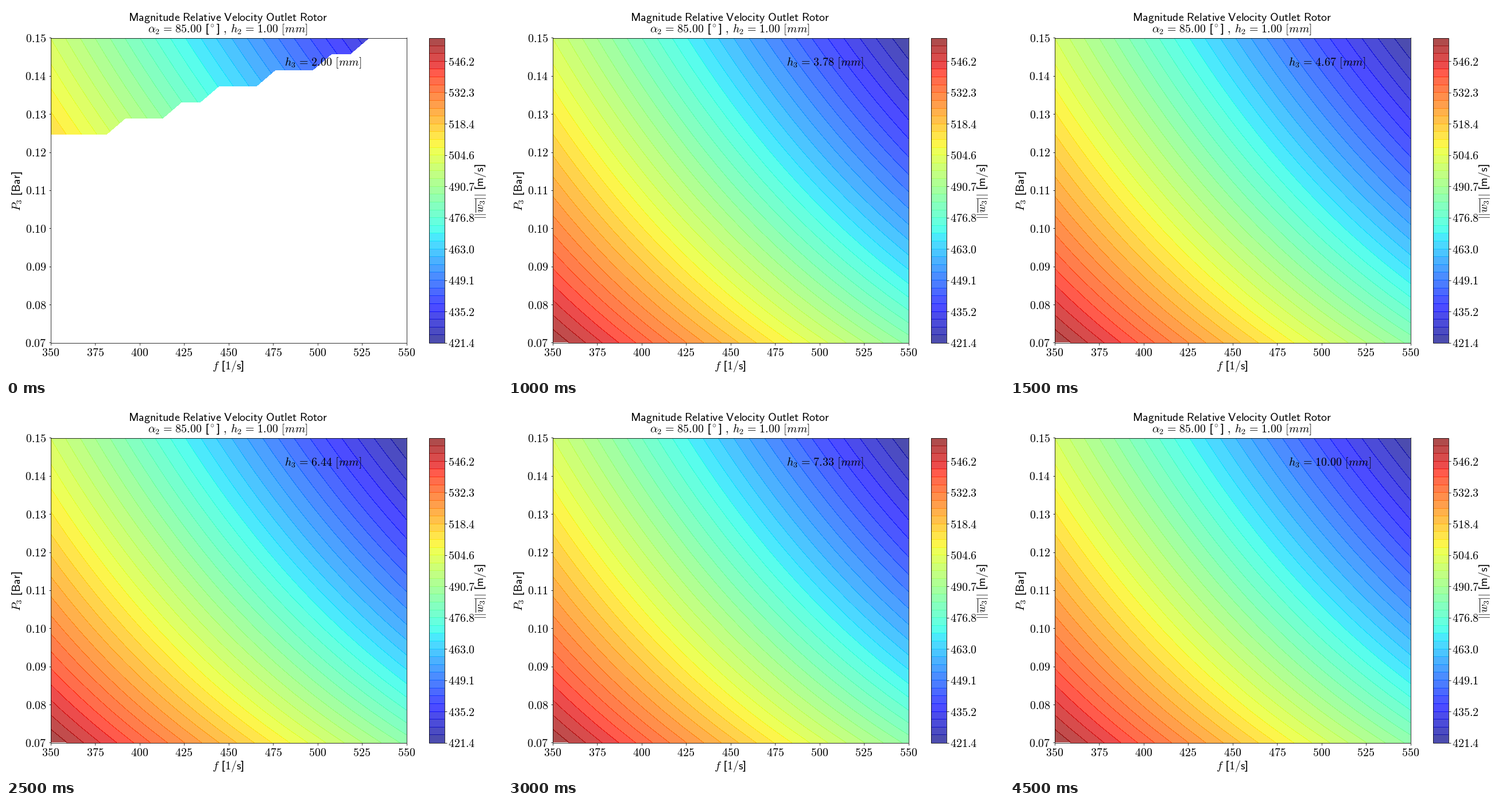
Recreate the animation shown at these times as a matplotlib script. Size 864x648 px, loop 5000 ms.

```python
import numpy as np
import matplotlib.pyplot as plt
from matplotlib.animation import FuncAnimation

W, H, DPI = 864, 648, 72
FRAMES, STEP = 10, 500
N = 20

plt.rcParams.update({
    "font.family": "Liberation Sans",
    "font.size": 20,
    "mathtext.fontset": "cm",
    "axes.linewidth": 0.8,
})

EQ = r"\hspace{0.12}=\hspace{0.12}"
GAP = r"\hspace{0.38}"

fig = plt.figure(figsize=(W / DPI, H / DPI), dpi=DPI, facecolor="white")


def box(left, top, right, bottom):
    """Axes placed by pixel edges, measured from the top left."""
    return fig.add_axes([left / W, 1 - bottom / H,
                         (right - left) / W, (bottom - top) / H])


def put(x, y, s, ha="center", **kw):
    return fig.text(x / W, 1 - y / H, s, ha=ha, va="baseline",
                    rotation_mode="anchor", **kw)


def sans(s):
    return r"\mathsf{" + s.replace(" ", r"\ ") + "}"


def numbers(values, digits):
    return [rf"$\mathrm{{{v:.{digits}f}}}$" for v in values]


# Relative velocity over rotation frequency and outlet pressure
freq = np.linspace(350, 550, N)
pres = np.linspace(0.07, 0.15, N)
F, P = np.meshgrid(freq, pres)
u = (F - 350) / 200
speed = np.sqrt(251080 - 83762 * u + 10235 * u**2 + 77000 * np.log(0.15 / P))
levels = np.linspace(speed.min(), speed.max(), 40)


def feasible(first_row, last_cols):
    """Keep, from first_row upwards, the columns up to each row's last one."""
    last = np.full(N, -1)
    last[first_row:first_row + len(last_cols)] = last_cols
    last[first_row + len(last_cols):] = N - 1
    return np.arange(N)[None, :] <= last[:, None]


masks = [
    feasible(13, [3, 6, 8, 11, 14, 16, 17]),
    feasible(2, [2, 7, 12, 17]),
    feasible(0, []),
]

ax = box(77.5, 55.5, 697.5, 586.5)
fills = [ax.contourf(F, P, np.ma.masked_where(~m, speed), levels=levels,
                     cmap="jet", alpha=0.7, antialiased=False)
         for m in masks]
ax.set_xlim(350, 550)
ax.set_ylim(0.07, 0.15)
xticks = np.arange(350, 551, 25)
yticks = np.linspace(0.07, 0.15, 9)
ax.set_xticks(xticks, numbers(xticks, 0))
ax.set_yticks(yticks, numbers(yticks, 2))
ax.tick_params(axis="x", pad=5)
ax.tick_params(axis="y", pad=3.5)

cax = box(737, 55.5, 763.5, 586.5)
bar = fig.colorbar(fills[-1], cax=cax)
bar.solids.set_snap(False)
bar.set_ticks(levels[::4], labels=numbers(levels[::4], 1))
bar.ax.tick_params(pad=3.5)
bar.ax.minorticks_off()

put(386.5, 25.5, f"${sans('Magnitude Relative Velocity Outlet Rotor')}$")
put(386.5, 46.4,
    rf"$\alpha_{{\mathrm{{2}}}}{EQ}{sans('85.00')}{GAP}$[$^\circ$]"
    rf"${GAP}{{,}}{GAP}h_{{\mathrm{{2}}}}{EQ}{sans('1.00')}{GAP}[mm]$")
put(387, 633.4, rf"$f{GAP}$[${sans('1/s')}$]")
put(25, 322, rf"$P_{{\mathrm{{3}}}}{GAP}$[${sans('Bar')}$]", rotation=90)
put(832, 322.5,
    rf"$||\overline{{w_{{\mathrm{{3}}}}}}||{GAP}$[${sans('m/s')}$]",
    rotation=90)
note = put(485, 104.6, "", ha="left")

heights = np.linspace(2, 10, FRAMES)


def update(i):
    shown = min(i, len(fills) - 1)
    for k, fill in enumerate(fills):
        fill.set_visible(k == shown)
    value = sans(f"{heights[i]:.2f}")
    note.set_text(rf"$h_{{\mathrm{{3}}}}{EQ}{value}{GAP}[mm]$")
    return [*fills, note]


anim = FuncAnimation(fig, update, frames=FRAMES, interval=STEP,
                     init_func=lambda: update(0), repeat=True,
                     repeat_delay=0, blit=False)
plt.show()
```
